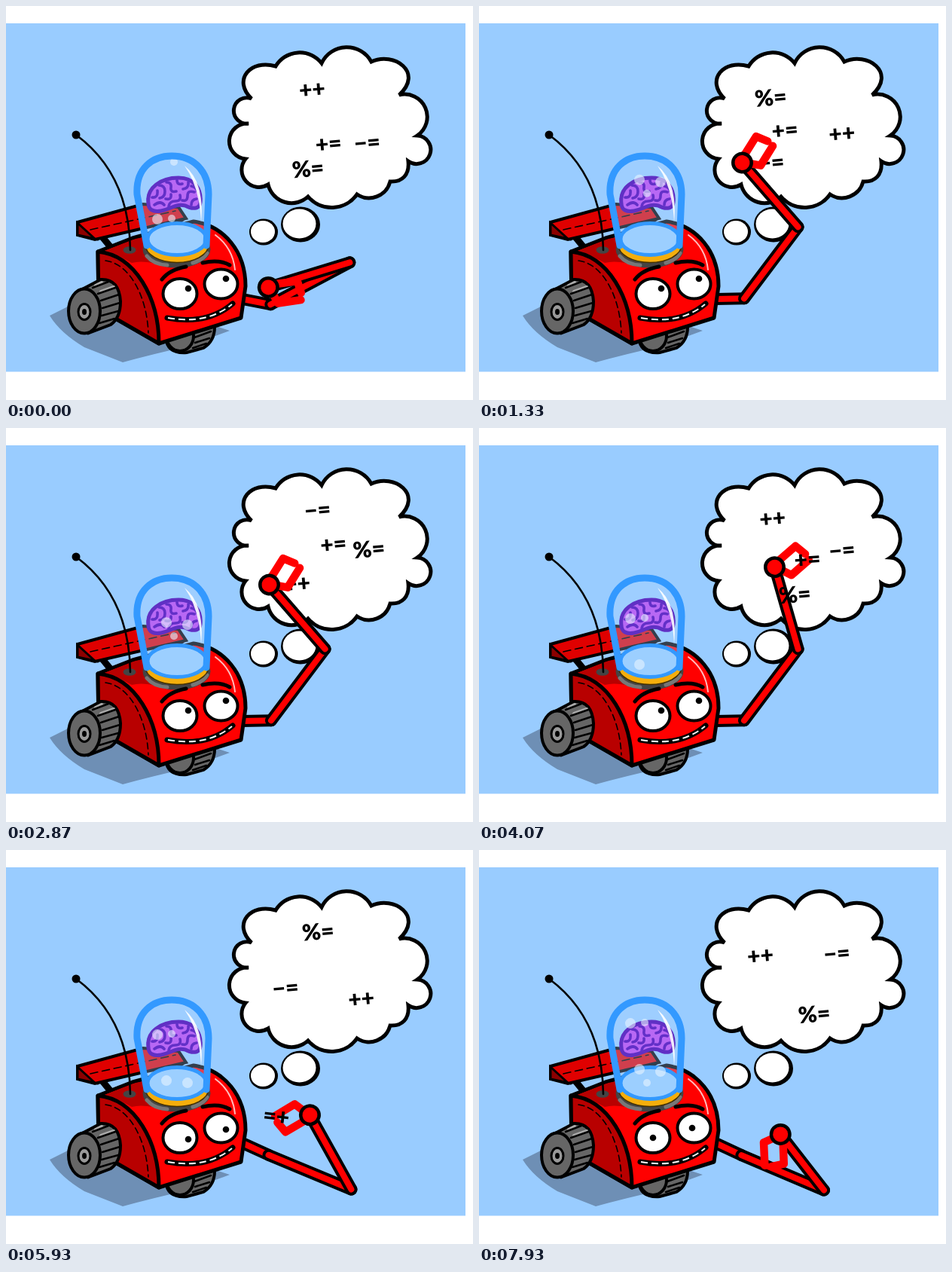
An HTML page for the animation above (8000 ms loop, 620 by 523 pixels).

```html
<!DOCTYPE html>
<html lang="en">
<head>
<meta charset="utf-8">
<title>Thinking robot</title>
<style>
  html, body { margin: 0; width: 100%; height: 100%; overflow: hidden; background: #fff; }
  svg { display: block; width: 620px; height: 523px; }
  .op { font: 900 30px Lato, "Open Sans", sans-serif; text-anchor: middle; }
</style>
</head>
<body>
<svg viewBox="0 0 620 523" fill="none" stroke-linecap="round">
  <rect y="23" width="610" height="462.5" fill="#9cf"/>
  <path fill="#6e8fb5" d="M58 411L84 398L210 402L297 431L240 452Q195 462 155 473L104 453Q72 434 58 411Z"/>

  <!-- thought cloud -->
  <path fill="#fff" stroke="#000" stroke-width="5" d="M326 123C300 98 325 70 358 80A37 37 0 0 1 419 76A37 37 0 0 1 485 74
    C515 60 555 88 522 118A30 30 0 0 1 546 172A18.8 18.8 0 1 1 534 206C536 224 526 234 510 233A29 29 0 0 1 466 250
    A41 41 0 0 1 401 253A32 32 0 0 1 348 237A23 23 0 0 1 318 203A23.5 23.5 0 0 1 322 156A17.2 17.2 0 1 1 326 123Z"/>
  <g fill="#000"><ellipse cx="342" cy="300" rx="19" ry="17.5"/><ellipse cx="391" cy="290" rx="26" ry="23.5"/></g>
  <g fill="#fff"><ellipse cx="341" cy="299.5" rx="16" ry="14.5"/><ellipse cx="389.5" cy="289" rx="22" ry="19.5"/></g>

  <g id="action"><g id="ops" fill="#000"></g><g id="arm"></g></g>

  <!-- far wheel -->
  <g stroke="#000" stroke-width="4">
    <path fill="#666" d="M212 440L262 420L277 426Q277 445 262 454L240 460Q214 462 212 440Z"/>
    <path stroke-width="2.5" d="M250 440L272 432M251 447L270 441M248 454L266 448"/>
    <ellipse cx="231" cy="438" rx="18" ry="20" fill="#666"/>
  </g>

  <!-- spoiler -->
  <path stroke="#000" stroke-width="9" d="M129 308L138 319M225 287L233 282"/>
  <path fill="#e00000" stroke="#000" stroke-width="4" d="M95 287L182 263L229 267L239 282L118 310L95 304Z"/>
  <path fill="#8c0000" stroke="#000" stroke-width="3" d="M95 288L118 309L95 304Z"/>
  <path stroke="#000" stroke-width="1.6" stroke-dasharray="10 6" d="M112 297L225 272"/>

  <!-- body -->
  <path fill="#f00" stroke="#000" stroke-width="5" stroke-linejoin="round" d="M122 326L168 308L249 286C290 292 318 326 318 372L312 414L203 448L123 402Z"/>
  <path fill="#b80000" d="M123 328L172 309L190 306L216 347Q185 336 167 341Q146 328 123 328Z"/>
  <path fill="#b80000" stroke="#000" stroke-width="5" stroke-linejoin="round" d="M122 326C172 331 203 388 203 448L123 402Z"/>
  <path stroke="#000" stroke-width="1.6" stroke-dasharray="8 5" d="M132 338C164 342 187 385 189 434"/>
  <path stroke="#fbb" stroke-width="2" d="M278 304Q301 321 304 350"/>
  <ellipse cx="164" cy="324" rx="8.5" ry="4.8" fill="#444"/>
  <path stroke="#000" stroke-width="2.6" d="M93 171C135 202 164 250 165 324"/>
  <circle cx="93" cy="171" r="5.5" fill="#000"/>

  <!-- near wheel -->
  <g stroke="#000" stroke-width="4">
    <path fill="#666" d="M103 375L126 363Q150 362 152 392Q152 414 139 423L110 434Z"/>
    <path stroke="#aaa" d="M119 371L127 367M126 379L143 373"/>
    <path stroke-width="2.5" d="M115 374L136 366M122 382L145 374M126 391L150 383M128 401L151 394M127 411L149 405M124 421L144 415"/>
    <ellipse cx="104" cy="405" rx="21" ry="29.5" fill="#666"/>
    <ellipse cx="104" cy="406" rx="8" ry="10.5" fill="#999" stroke-width="3"/>
    <ellipse cx="104" cy="406" rx="3" ry="4" fill="#000" stroke="none"/>
  </g>

  <!-- brain jar -->
  <ellipse cx="226.5" cy="323" rx="45" ry="24.5" fill="#444"/>
  <path stroke="#777" stroke-width="5" d="M187 332Q196 343 214 344M248 341Q262 337 267 328"/>
  <ellipse cx="227" cy="317" rx="42" ry="23.5" fill="#f5ae0c" stroke="#443000" stroke-width="1.5"/>
  <path fill="#a8cfff" fill-opacity=".3" d="M187 312L174 250C172 215 195 199 220 199C250 199 269 220 269 250L266 312Q227 340 187 312Z"/>
  <ellipse cx="227" cy="309.5" rx="39" ry="21" fill="#9ccfff" stroke="#39f" stroke-width="5"/>
  <path fill="#b868f4" stroke="#6030c4" stroke-width="5" d="M189 262C186 241 206 228 229 228C250 228 260 243 258 261C257 270 247 270 238 265C225 262 221 269 206 272C195 274 189 270 189 262Z"/>
  <path stroke="#6330c8" stroke-width="3.6" d="M194 254Q202 255 201 245M203 238Q211 238 211 246T204 255M197 264Q205 258 210 264M213 234Q220 234 219 241T226 246
    M227 231Q227 238 234 236M212 256Q220 258 219 250M216 266Q217 259 225 259T231 251M235 243Q243 242 242 234M234 258Q241 260 241 252T250 247M246 239Q252 240 254 246M246 264Q246 257 253 256"/>
  <g id="bubbles" fill="#e8f3ff" fill-opacity=".6"></g>
  <path stroke="#39f" stroke-width="9" d="M187 318L174 250C172 215 195 199 220 199C250 199 269 220 269 250L266 318"/>
  <path fill="#fff" fill-opacity=".9" d="M237 212Q264 234 259 287Q257 240 237 212Z"/>

  <!-- face -->
  <g stroke="#000" stroke-width="5">
    <path d="M207 363Q217 350 239 346M261 341Q283 336 297 344"/>
    <g fill="#fff" stroke-width="4">
      <ellipse cx="231" cy="382" rx="22.5" ry="20"/><ellipse cx="285.5" cy="369" rx="22" ry="19.5"/>
    </g>
    <path stroke-width="7" d="M214 414Q267 424 301 395"/>
    <path stroke="#fff" stroke-width="2" stroke-linecap="butt" stroke-dasharray="9 5" d="M215 414Q267 423 300 396"/>
  </g>
  <g id="pupils" fill="#000"><circle r="4.3"/><circle r="4.3"/></g>
</svg>
<script>
const LOOP = 8000, FRAME = 1000 / 12, RAD = Math.PI / 180;
const GRAB = 4000, RELEASE = 6900;
const TURN = 0.0852;    // orbit speed, degrees per ms
const RISE = 0.085;     // bubble speed, pixels per ms
const byId = id => document.getElementById(id);

function add(parent, tag, attrs, text) {
  const el = document.createElementNS("http://www.w3.org/2000/svg", tag);
  for (const k in attrs) el.setAttribute(k, attrs[k]);
  if (text) el.textContent = text;
  parent.appendChild(el);
  return el;
}

const progress = (t, from, to) => Math.min(1, Math.max(0, (t - from) / (to - from)));
const mix = (a, b, p) => a + (b - a) * p;
const polar = ([x, y], angle, r) => [x + r * Math.cos(angle * RAD), y + r * Math.sin(angle * RAD)];
const show = (el, on) => el.setAttribute("visibility", on ? "visible" : "hidden");
const place = (el, [x, y], angle = 0) => el.setAttribute("transform", `translate(${x} ${y}) rotate(${angle})`);

// Angles of the three limbs and the claw.
const folded = [11, -28, -197, 15];
const raised = [-1, -53, -131, -35];
const reaching = [-1, -53, -106, -18];
const pulling = [3, 0, -125, -111];
const showing = [25, 23, -119, -189];
const emptied = [25, 23, -128, -250];
const moves = [
  { from: 0, to: 1250, pose: raised },
  { from: 3000, to: GRAB, pose: reaching },
  { from: 4100, to: 5200, pose: pulling },
  { from: 5200, to: 5930, pose: showing },
  { from: 6500, to: 7930, pose: emptied }
];
const poseAt = t => moves.reduce((pose, m) => pose.map((a, i) => mix(a, m.pose[i], progress(t, m.from, m.to))), folded);

const ops = byId("ops"), arm = byId("arm"), action = byId("action");
const operator = (parent, text) => add(parent, "text", { class: "op", y: 10 }, text);
const orbiters = [
  { text: "++", start: -109, centre: [425, 165], radius: 57 },
  { text: "−=", start: 17, centre: [425, 165], radius: 57 },
  { text: "%=", start: 115, centre: [425, 165], radius: 57 },
  { text: "+=", start: 72, centre: [423, 167], radius: 17 }
].map(o => ({ ...o, el: operator(ops, o.text) }));
const loose = orbiters[3].el;

const limbLengths = [38, 119, 113];
const limbs = limbLengths.map(() => [["#000", 16], ["#f00", 8]]
  .map(([stroke, width]) => add(arm, "line", { stroke, "stroke-width": width })));
const hand = add(arm, "g");
for (const d of ["M9 -7L35 -18L44 -4", "M9 8L18 17L46 5"])
  add(hand, "path", { d, stroke: "#f00", "stroke-width": 10.5, "stroke-linejoin": "round" });
add(hand, "circle", { r: 14.5, fill: "#000" });
add(hand, "circle", { r: 10, fill: "#f00" });
const held = operator(hand, "+=");
held.setAttribute("fill", "#000");
held.setAttribute("transform", "translate(44.5 4) rotate(14)");

const bubbles = [[201, 283, 7], [220, 282, 5], [213, 344, 7], [241, 347, 7], [223, 362, 5]]
  .map(([x, y, r]) => ({ y, el: add(byId("bubbles"), "circle", { cx: x, r }) }));
const pupils = byId("pupils").children;

function drawArm(t) {
  const pose = poseAt(t);
  const shrink = mix(1, 0.83, progress(t, 6500, 7930));
  let joint = [314, 389];
  limbs.forEach((lines, i) => {
    const end = polar(joint, pose[i], limbLengths[i] * (i === 2 ? shrink : 1));
    for (const line of lines) {
      const ends = { x1: joint[0], y1: joint[1], x2: end[0], y2: end[1] };
      for (const k in ends) line.setAttribute(k, ends[k]);
    }
    joint = end;
  });
  place(hand, joint, pose[3]);
  // Waiting, the claw hides the symbols; for the catch it goes behind them.
  const front = t < 3500 ? arm : ops;
  if (action.lastElementChild !== front) action.appendChild(front);
}

function render(t) {
  for (const o of orbiters) place(o.el, polar(o.centre, o.start + TURN * t, o.radius), -5);
  show(loose, t < GRAB);
  show(held, t >= GRAB && t < RELEASE);
  drawArm(t);

  for (const b of bubbles) {
    const y = 170 + ((b.y - RISE * t - 170) % 155 + 155) % 155;
    b.el.setAttribute("cy", y);
    show(b.el, y > 205 && y < 316);
  }

  // The eyes follow the catch down, then look straight ahead.
  const aside = 1 - progress(t, 6700, 7500);
  const dy = aside * mix(-7, 2, progress(t, GRAB, 5930));
  place(pupils[0], [231 + 11 * aside, 382 + dy]);
  place(pupils[1], [283 + 9 * aside, 369 + dy]);
}

const started = performance.now();
function tick() {
  const t = (performance.now() - started) % LOOP;
  render(Math.floor((t + 8) / FRAME) * FRAME % LOOP);
  requestAnimationFrame(tick);
}
tick();
</script>
</body>
</html>
```
